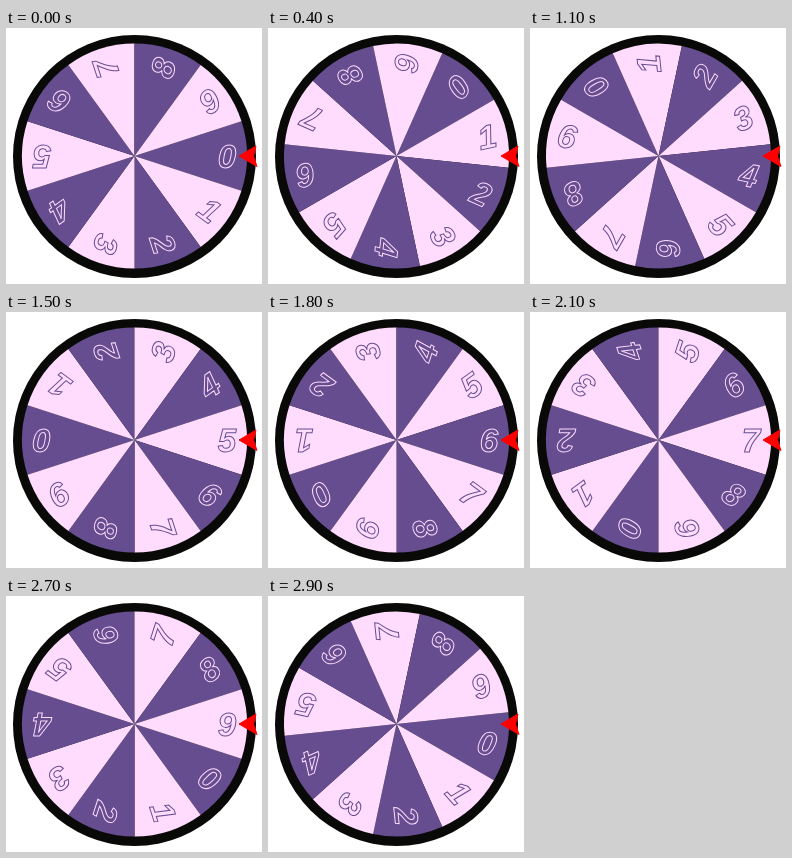
Animation of 256x256 px, one loop 3000 ms. Source, as an HTML page:

```html
<!DOCTYPE html>
<html lang="en">
<head>
<meta charset="utf-8">
<title>Number wheel</title>
<style>
  html, body { margin: 0; width: 100%; height: 100%; overflow: hidden; background: #fff; }
  svg { display: block; width: 100vw; height: 100vh; }
  text { font: italic bold 33px "Liberation Sans", Arial, sans-serif; text-anchor: middle; }
</style>
</head>
<body>
<svg viewBox="0 0 256 256">
  <circle cx="128.5" cy="128.5" r="121.5" fill="#090908"/>
  <g id="wheel"></g>
  <path d="M233 128 250 118 247.5 128 251 138.5Z" fill="#f00" stroke="#f00" stroke-linejoin="round"/>
</svg>
<script>
  const LOOP = 3000, STEP = 100, SECTORS = 10, RADIUS = 112.5;
  const PURPLE = '#654d8f', PINK = '#ffdcfe';
  const wheel = document.getElementById('wheel');

  const half = Math.PI / SECTORS;
  const x = RADIUS * Math.cos(half), y = RADIUS * Math.sin(half);
  const sector = n => {
    const [fill, line] = n % 2 ? [PINK, PURPLE] : [PURPLE, PINK];
    return `<g transform="rotate(${n * 360 / SECTORS})" fill="${fill}">
      <path d="M0 0 ${x} ${-y}A${RADIUS} ${RADIUS} 0 0 1 ${x} ${y}Z"/>
      <text x="92.5" y="11.5" stroke="${line}">${n}</text></g>`;
  };
  wheel.innerHTML = Array.from({ length: SECTORS }, (_, n) => sector(n)).join('');

  // The wheel turns counter-clockwise in discrete steps, once per loop.
  function draw() {
    const time = Math.floor(performance.now() % LOOP / STEP) * STEP;
    wheel.setAttribute('transform', `translate(128.5 128) rotate(${-360 * time / LOOP})`);
    requestAnimationFrame(draw);
  }
  draw();
</script>
</body>
</html>
```
